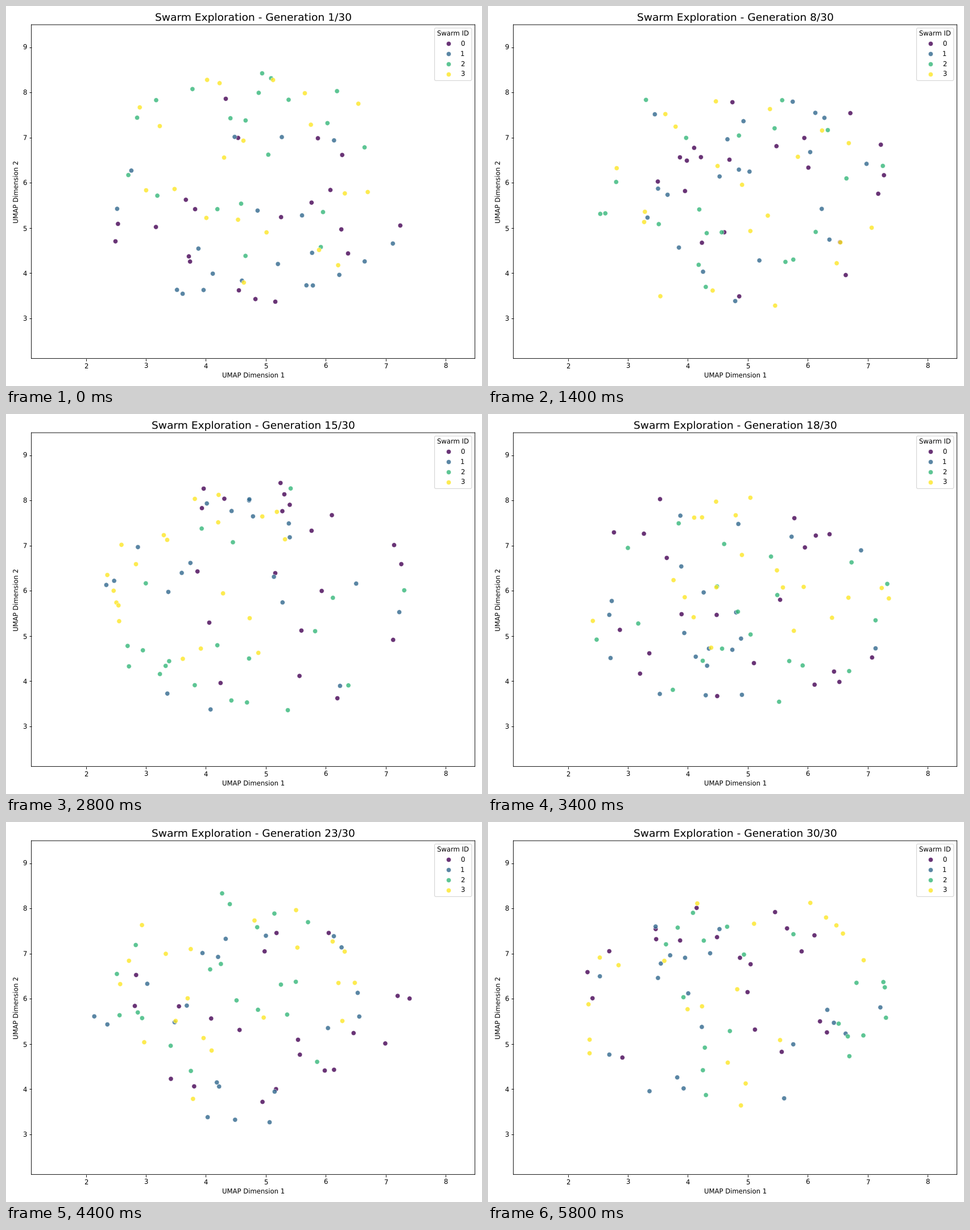
Recreate the animation shown at these times as a matplotlib script. Size 837 by 669 pixels, loop 6 s.

```python
import matplotlib.pyplot as plt
import numpy as np
from matplotlib.animation import FuncAnimation
from matplotlib.lines import Line2D

W, H, DPI = 837, 669, 83.7
GENERATIONS, SWARMS, SIZE = 30, 4, 20
CENTER, RADIUS = (4.78, 5.81), 2.65
DRIFT = 0.15
MARKER = 50
EDGE = 0.08 * MARKER ** 0.5


def scatter_swarm(rng):
    """Spread one swarm over the round cloud, slightly off its middle."""
    r = np.sqrt(rng.uniform(0, 1, SIZE))
    a = rng.uniform(0, 2 * np.pi, SIZE)
    p = np.column_stack([r * np.cos(a), r * np.sin(a)])
    p += rng.normal(0, DRIFT, 2)
    # Fold anything past the rim back inside.
    p /= np.maximum(1, np.hypot(p[:, 0], p[:, 1]))[:, None] ** 2
    return CENTER + RADIUS * p


def positions(gen):
    rng = np.random.default_rng(gen)
    return np.vstack([scatter_swarm(rng) for _ in range(SWARMS)])


# Soft, unsnapped lines and unhinted text.
plt.rcParams.update({"font.family": "DejaVu Sans",
                     "text.hinting": "none",
                     "path.snap": False})

fig = plt.figure(figsize=((W + 0.01) / DPI, (H + 0.01) / DPI), dpi=DPI)
ax = fig.add_axes([44.6 / W, 1 - 620.6 / H, 780 / W, 587.6 / H])
ax.set(xlim=(1.09, 8.489), ylim=(2.111, 9.497),
       xticks=range(2, 9), yticks=range(3, 10),
       xlabel="UMAP Dimension 1", ylabel="UMAP Dimension 2")
title = ax.set_title("", fontsize=16)

colors = plt.get_cmap("viridis")(np.linspace(0, 1, SWARMS))
dots = ax.scatter(*positions(1).T, s=MARKER, alpha=0.8,
                  c=np.repeat(colors, SIZE, axis=0),
                  edgecolors="white", linewidths=EDGE)
handles = [Line2D([], [], ls="", marker="o", ms=MARKER ** 0.5, color=c,
                  alpha=0.8, mec="white", mew=EDGE, label=str(i))
           for i, c in enumerate(colors)]
ax.legend(handles=handles, title="Swarm ID", loc="upper right",
          labelspacing=0.54)


def update(i):
    dots.set_offsets(positions(i + 1))
    title.set_text(f"Swarm Exploration - Generation {i + 1}/{GENERATIONS}")
    return dots, title


anim = FuncAnimation(fig, update, frames=GENERATIONS, interval=200,
                     repeat=True, repeat_delay=0)
plt.show()
```
